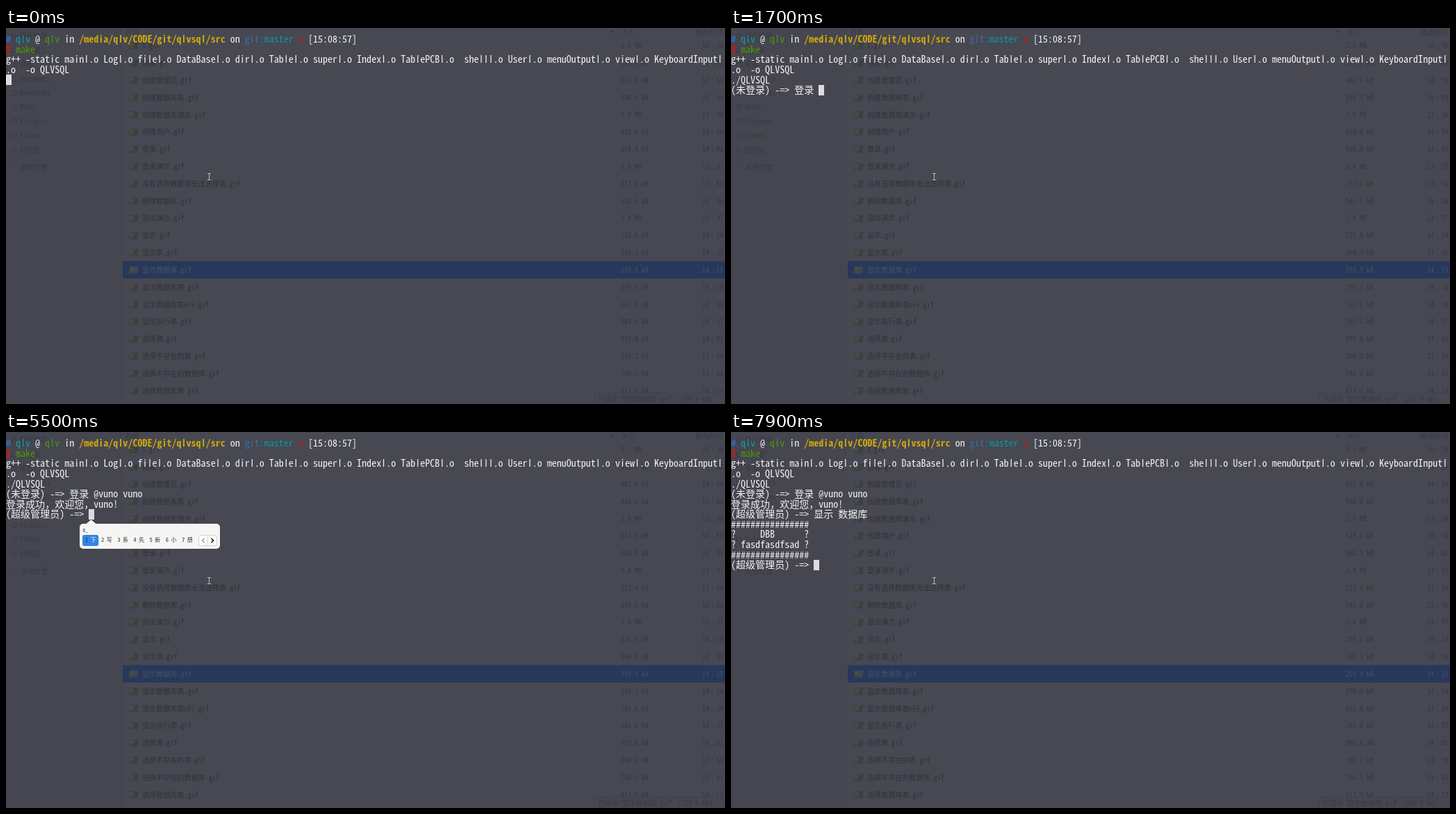
Animation, 1035 px wide and 541 px high, one loop 8 s. Source, as an HTML page with a canvas:

```html
<!DOCTYPE html>
<html lang="zh-CN">
<head>
<meta charset="utf-8">
<style>
html, body { margin: 0; width: 100%; height: 100%; overflow: hidden; background: #474852; }
canvas { display: block; }
</style>
</head>
<body>
<canvas id="stage" width="1035" height="541"></canvas>
<script>
const ctx = document.getElementById("stage").getContext("2d");
const MONO = '"Noto Sans Mono CJK SC", "Noto Sans CJK SC", "Noto Sans CJK", "Noto Sans Mono", monospace';
const LOOP = 8000, CELL = 7.015, ROW = 14.57, TOP = 9.4;

const isWide = ch => ch.charCodeAt(0) > 0x2e7f;
const columns = text => [...text].reduce((n, ch) => n + (isWide(ch) ? 2 : 1), 0);

function rect(x, y, w, h, color) {
  ctx.fillStyle = color;
  ctx.fillRect(x, y, w, h);
}

function box(x, y, w, h, r, fill, stroke) {
  ctx.beginPath();
  ctx.roundRect(x, y, w, h, r);
  if (fill) { ctx.fillStyle = fill; ctx.fill(); }
  if (stroke) { ctx.strokeStyle = stroke; ctx.lineWidth = 1; ctx.stroke(); }
}

function polygon(points, color) {
  ctx.beginPath();
  points.forEach(([x, y]) => ctx.lineTo(x, y));
  ctx.fillStyle = color;
  ctx.fill();
}

function line(points, color, width = 1) {
  ctx.beginPath();
  points.forEach(([x, y]) => ctx.lineTo(x, y));
  ctx.strokeStyle = color;
  ctx.lineWidth = width;
  ctx.stroke();
}

// Monospaced text centred vertically on y; wide characters take two cells.
function write(text, x, y, cell, color, weight = 400) {
  ctx.fillStyle = color;
  ctx.textAlign = "center";
  for (const ch of text) {
    const w = cell * (isWide(ch) ? 2 : 1);
    // A plain bar for the lowercase l
    ctx.font = `${weight} ${cell * 2}px ${ch === "l" ? '"Liberation Sans", sans-serif' : MONO}`;
    ctx.fillText(ch, x + w / 2, y + cell * 0.7);
    x += w;
  }
  return x;
}

const files = `1|2.1 MB|10:35
创建|515.0 kB|15:02
创建管理员|861.6 kB|14:59
创建数据库表|938.0 kB|15:03
创建数据库演示|2.9 MB|13:38
创建用户|618.6 kB|14:50
登录|668.9 kB|14:41
登录演示|3.8 MB|13:37
没有选择数据库无法选择表|217.4 kB|13:56
删除数据库|541.6 kB|15:06
退出演示|1.8 MB|13:37
显示|235.6 kB|14:14
显示表|368.3 kB|14:35
显示数据库|259.9 kB|14:15
显示数据库表|299.3 kB|14:18
显示数据库表n行|161.6 kB|14:39
显示执行表|282.6 kB|14:37
选择表|992.8 kB|14:01
选择不存在的表|398.2 kB|13:59
选择不存在的数据库|746.1 kB|13:41
选择数据库表|413.9 kB|14:12`.split("\n").map(row => row.split("|"));
const SELECTED = 13;
const places = ["最近使用", "主目录", "桌面", "Documents", "Downloads", "Music", "Pictures", "Videos", "回收站"];

function drawThumbnail(x, y, chosen) {
  polygon([[x + 1, y - 5], [x + 14, y - 5], [x + 12, y + 5], [x, y + 5]], chosen ? "#3c4655" : "#3a4043");
  polygon([[x + 1, y - 4], [x + 8, y - 4], [x + 6, y + 1], [x + 1, y + 1]], "#504a40");
  polygon([[x + 1, y + 1], [x + 8, y + 1], [x + 6, y + 4], [x + 1, y + 4]], "#3d4a3e");
}

function drawFileManager() {
  const faint = "#393a43", dim = "#373841";
  rect(0, 0, 1035, 541, "#474852");
  rect(0, 0, 167, 541, "#454650");
  places.forEach((name, i) => {
    const y = 12 + i * 20.4;
    box(8.5, y - 3, 6, 6, i ? 1 : 3, null, faint);
    write(name, 20, y, 4.9, faint);
  });
  write("+", 8, 200.5, 4.9, faint);
  write("其他位置", 21, 200.5, 4.9, faint);

  write("名称", 171, 6, 5, faint);
  write("大小", 886, 6, 5, faint);
  write("修改时间", 992, 6, 5, faint);
  polygon([[870, 4], [876, 4], [873, 8]], faint);

  files.forEach(([name, size, time], i) => {
    const y = 25.7 + i * 24.82, chosen = i === SELECTED;
    if (chosen) rect(168, y - 13, 867, 25, "#28385a");
    drawThumbnail(177, y, chosen);
    write(name + ".gif", 196, y, 5.05, chosen ? "#46536c" : "#303139");
    const detail = chosen ? "#43506a" : dim;
    const [hours, minutes] = time.split(":");
    write(size, 885, y, 5, detail);
    write(hours, 1002, y, 5.1, detail);
    write(":", 1014.7, y, 5.1, detail);
    write(minutes, 1022.4, y, 5.1, detail);
  });
  box(846.5, 525.5, 195, 20, 3, "#464751", "#404149");
  write("已选中“显示数据库.gif” (259.9 kB)", 852, 534, 5, faint);
}

function drawPointer() {
  const c = "#bcbcc0";
  line([[292.5, 209.5], [292.5, 218.5]], c);
  line([[290, 209.5], [295, 209.5]], c);
  line([[290, 218.5], [295, 218.5]], c);
}

const rowY = row => TOP + ROW * row;
const middle = row => rowY(row) + 7;
const WHITE = "#f4f4f4";

function drawHeader() {
  let x = 0;
  const spans = [
    ["# ", "#2f6fc4", 700], ["qlv ", "#0aa0a8"], ["@ ", WHITE], ["qlv ", "#4e9a06"], ["in ", WHITE],
    ["/media/qlv/CODE/git/qlvsql/src ", "#d0a808", 700], ["on ", WHITE], ["git:", "#3a6cb0"],
    ["master ", "#0a98a0"], ["x ", "#cc1111"], ["[15:08:57]", WHITE]
  ];
  for (const [text, color, weight] of spans) x = write(text, x, middle(0), CELL, color, weight);
  write("$", 0, middle(1), CELL, "#e01010", 700);
  write("make", 2 * CELL, middle(1), CELL, "#4e9a06");
  write("g++ -static mainl.o Logl.o filel.o DataBasel.o dirl.o Tablel.o superl.o Indexl.o TablePCBl.o  " +
    "shelll.o Userl.o menuOutputl.o viewl.o KeyboardInputl", 0, middle(2), CELL, WHITE);
  write(".o  -o QLVSQL", 0, middle(3), CELL, WHITE);
}

function drawInputPanel(cursorX, cursorY, typed, candidates) {
  const x = cursorX - 13, y = cursorY + 21;
  const items = candidates.split(" ");
  const itemWidth = item => 15.2 + 8 * item.length;
  const width = items.reduce((sum, item) => sum + itemWidth(item), 39.6);
  box(x, y, width, 36, 5, "#f6f5f4");
  polygon([[x + 9, y + 0.5], [x + 16.5, y - 6], [x + 24, y + 0.5]], "#f6f5f4");
  write(typed + "_", x + 4.5, y + 9, 3.75, "#222");

  let left = x + 4;
  items.forEach((item, i) => {
    if (!i) box(left, y + 16, itemWidth(item), 16, 3, "#3584e4");
    write(String(i + 1), left + 4, y + 23, 4, i ? "#222" : "#0c2c55");
    write(item, left + 11.5, y + 23, 4, i ? "#333" : "#fff");
    left += itemWidth(item);
  });

  const nav = x + width - 30.5, mid = y + 24;
  box(nav, y + 16.5, 26, 15, 3, "#fcfcfb", "#d5d0cc");
  line([[nav + 13, y + 16.5], [nav + 13, y + 31.5]], "#d5d0cc");
  line([[nav + 8, mid - 3], [nav + 5, mid], [nav + 8, mid + 3]], "#8b8d8f", 1.1);
  line([[nav + 18, mid - 3], [nav + 21, mid], [nav + 18, mid + 3]], "#111", 1.5);
}

const guest = "./QLVSQL\n(未登录) -=> ";
const admin = guest + "登录 @vuno vuno\n登录成功，欢迎您，vuno!\n(超级管理员) -=> ";
const table = "################\n?     DBB      ?\n? fasdfasdfsad ?\n################\n";

// Start time, terminal output, then the pinyin and candidates of the input panel
const steps = [
  [0, ""],
  [100, guest],
  [900, guest, "d", "的 都 到 大 对 多 点"],
  [1100, guest, "de", "的 得 德 地 锝 嘚 底"],
  [1200, guest, "den", "等 登 灯 邓 瞪 凳 蹬"],
  [1300, guest, "deng", "等 登 灯 邓 瞪 凳 蹬"],
  [1400, guest, "deng l", "登录 登陆 等来 等量 登临 瞪羚 瞪了"],
  [1500, guest + "登录"],
  [1700, guest + "登录 "],
  [2300, guest + "登录 @"],
  [3100, guest + "登录 @e"],
  [3200, guest + "登录 @"],
  [3300, guest + "登录 @v"],
  [3500, guest + "登录 @vu"],
  [3600, guest + "登录 @vuno"],
  [4000, guest + "登录 @vuno "],
  [4300, guest + "登录 @vuno v"],
  [4500, guest + "登录 @vuno vu"],
  [4600, guest + "登录 @vuno vun"],
  [4700, guest + "登录 @vuno vuno"],
  [4900, admin],
  [5500, admin, "x", "下 写 系 先 新 小 想"],
  [5600, admin, "xi", "系 西 洗 细 喜 戏 吸"],
  [5800, admin, "xia", "下 夏 吓 瞎 虾 侠 霞"],
  [5900, admin, "xian", "先 现 线 县 西安 显 险"],
  [6100, admin, "xian s", "显示 现实 先生 线上 先是 限时 陷入"],
  [6200, admin, "xian sh", "显示 现实 先生 线上 先是 限时 闲书"],
  [6500, admin],
  [6600, admin + "显示"],
  [6800, admin + "显示 "],
  [7000, admin + "显示 ", "s", "是 说 上 时 三 所 谁"],
  [7100, admin + "显示 ", "shu", "数 书 树 输 属于 熟 术"],
  [7300, admin + "显示 ", "shu j k", "数据库 数据 书籍 书记 书架 竖井 书局看"],
  [7500, admin + "显示 数据库"],
  [7900, admin + "显示 数据库\n" + table + "(超级管理员) -=> "]
];

function draw([, output, typed, candidates]) {
  drawFileManager();
  drawPointer();
  drawHeader();
  const lines = output.split("\n");
  lines.forEach((text, i) => write(text, 0, middle(4 + i), CELL, WHITE));
  const x = Math.floor(columns(lines.at(-1)) * CELL), y = Math.floor(rowY(3 + lines.length));
  rect(x, y, 8, 15, "#dcdcdc");
  if (typed) drawInputPanel(x, y, typed, candidates);
}

let shown;
function tick() {
  const t = performance.now() % LOOP;
  const step = steps.findLast(([start]) => start <= t);
  if (step !== shown) draw(shown = step);
  requestAnimationFrame(tick);
}
tick();
</script>
</body>
</html>
```
